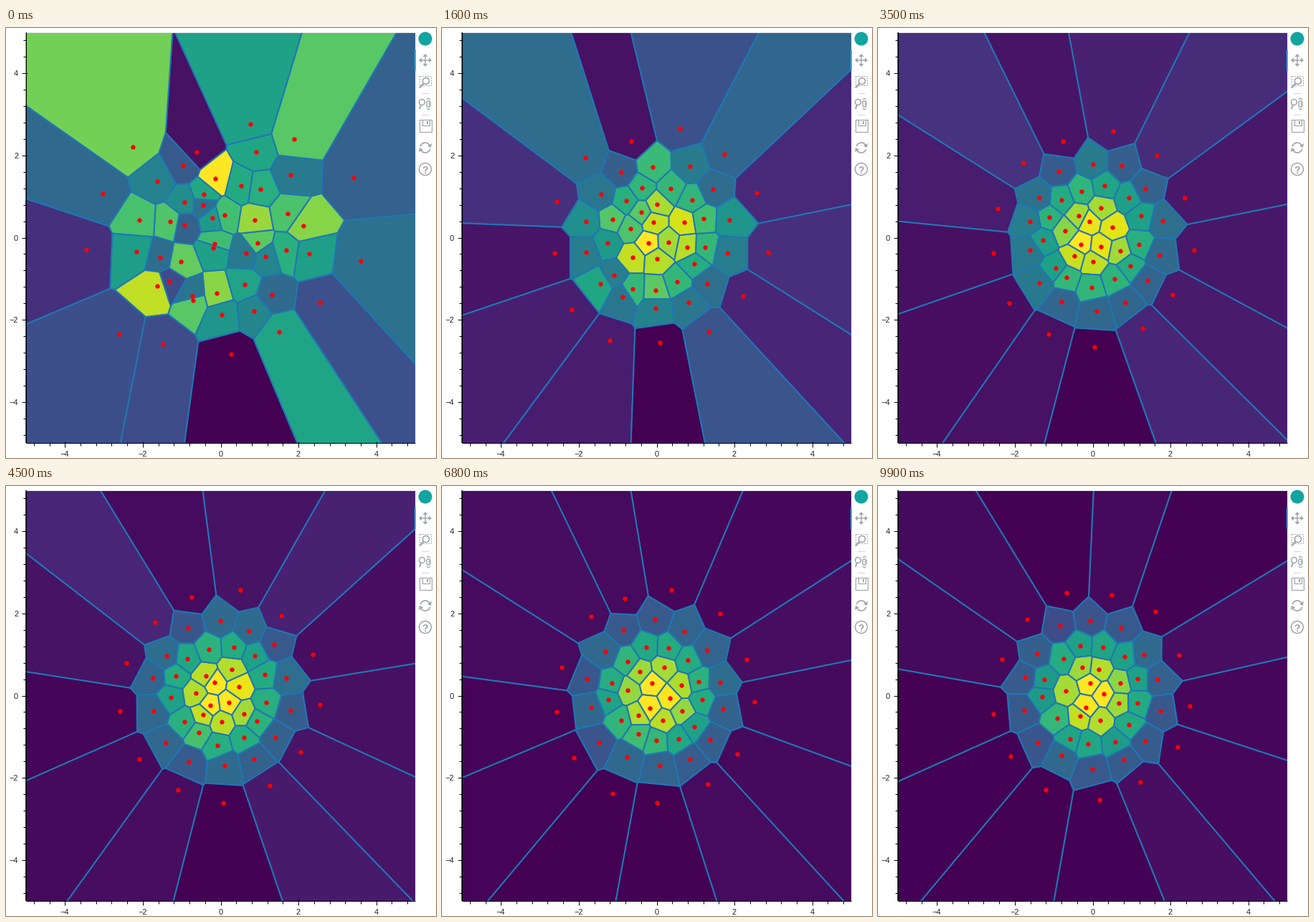
Write a matplotlib script that moves like this. It is 600 by 600 pixels and loops after 10 s.

```python
import matplotlib.pyplot as plt
import numpy as np
from matplotlib.animation import FuncAnimation
from matplotlib.collections import PolyCollection
from matplotlib.patches import Arc, Circle, FancyBboxPatch, Polygon, Rectangle

SIZE, DPI = 600, 100
FRAMES, INTERVAL = 100, 100
LEFT, TOP, WIDTH, HEIGHT = 27.5, 5.5, 543, 573
ORIGIN = np.array([LEFT + WIDTH / 2, TOP + HEIGHT / 2])
UNIT = np.array([WIDTH / 10, -HEIGHT / 10])
EDGE, GREY = "#1f77b4", "#a1a6a9"
PX = 72 / DPI                 # points per pixel

# Settled layout: (sites, radius, angle of the first site in degrees)
RINGS = [(3, .30, 100), (7, .70, 73), (13, 1.2, 75), (14, 1.78, 91),
         (13, 2.55, 78)]
ORDER_TIME = 11               # steps for the sites to fall into place
COUNT_TIME = 18               # steps for the cell weights to become reliable

rng = np.random.default_rng(12)


def settled():
    parts = []
    for count, radius, first in RINGS:
        a = np.radians(first) + 2 * np.pi * np.arange(count) / count
        parts.append(radius * np.column_stack([np.cos(a), np.sin(a)]))
    return np.concatenate(parts)


def wander(steps, count, keep=.95, kick=.02):
    """Random walk of every site that is pulled back to its home."""
    pos = rng.normal(0, kick / np.sqrt(1 - keep ** 2), (count, 2))
    for _ in range(steps):
        yield pos
        pos = keep * pos + rng.normal(0, kick, pos.shape)


HOME = settled()
COUNT = len(HOME)
angle = np.arctan2(HOME[:, 1], HOME[:, 0])
stretch = .2 + .2 * np.cos(2 * (angle - np.radians(15)))
SCATTER = HOME * stretch[:, None] + rng.normal(0, .2, HOME.shape)
WALK = list(wander(FRAMES, COUNT))
FIRST_COUNTS = (.64 - .14 * np.hypot(*HOME.T)
                + rng.normal(0, .2, COUNT)).clip(0, 1)


def sites(step):
    return HOME + SCATTER * np.exp(-step / ORDER_TIME) + WALK[step]


def weights(pts, step):
    """Rough first counts that turn into the weights of a normal law."""
    rough = np.exp(-step / COUNT_TIME)
    w = rough * FIRST_COUNTS + (1 - rough) * np.exp(-(pts ** 2).sum(1) / 3)
    return (w - w.min()) / (w.max() - w.min())


def clip(poly, nx, ny, c):
    """Part of a convex polygon where nx*x + ny*y <= c."""
    out = []
    px, py = poly[-1]
    pd = nx * px + ny * py - c
    for x, y in poly:
        d = nx * x + ny * y - c
        if (d > 0) != (pd > 0):
            k = pd / (pd - d)
            out.append((px + k * (x - px), py + k * (y - py)))
        if d <= 0:
            out.append((x, y))
        px, py, pd = x, y, d
    return out


def voronoi(pts):
    cells = []
    for p in pts:
        diff = pts - p
        dist = np.hypot(*diff.T)
        poly = [(-30, -30), (30, -30), (30, 30), (-30, 30)]
        for j in np.argsort(dist)[1:]:
            reach = max(np.hypot(x - p[0], y - p[1]) for x, y in poly)
            if dist[j] > 2 * reach:
                break
            nx, ny = map(float, diff[j])
            poly = clip(poly, nx, ny, float(diff[j] @ (p + pts[j])) / 2)
        cells.append(poly)
    return cells


fig = plt.figure(figsize=(SIZE / DPI, SIZE / DPI), dpi=DPI, facecolor="white")
plot = fig.add_axes([LEFT / SIZE, 1 - (TOP + HEIGHT) / SIZE,
                     WIDTH / SIZE, HEIGHT / SIZE])
plot.set(xlim=(-5, 5), ylim=(-5, 5))
plot.axis("off")
ui = fig.add_axes([0, 0, 1, 1], facecolor="none")
ui.set(xlim=(0, SIZE), ylim=(SIZE, 0))
ui.axis("off")


def line(xs, ys, color=GREY, width=1.5, **kw):
    ui.plot(xs, ys, color=color, lw=width * PX, solid_capstyle="butt", **kw)


def ring(x, y, r, width=1.5):
    ui.add_patch(Circle((x, y), r, fill=False, ec=GREY, lw=width * PX))


def fill(*pts):
    ui.add_patch(Polygon(pts, fc=GREY, lw=0))


def label(x, y, text, **kw):
    ui.text(x, y, text, family=["Liberation Sans", "DejaVu Sans"],
            va="center_baseline", **kw)


def draw_axes():
    right, bottom = LEFT + WIDTH, TOP + HEIGHT
    line([LEFT, right, right], [TOP, TOP, bottom], "#e5e5e5", 1)
    line([LEFT, LEFT], [TOP, bottom], "black", 1)
    line([LEFT, right], [bottom, bottom], "black", 1)
    for k in range(-12, 13):
        major = k % 5 == 0
        inner, outer = (2, 6) if major else (0, 4)
        x, y = np.floor(ORIGIN + UNIT * k * .4) + .5
        line([x, x], [bottom - inner, bottom + outer], "black", 1)
        line([LEFT - outer, LEFT + inner], [y, y], "black", 1)
        if major:
            text = str(k * 2 // 5).replace("-", "\u2212")
            style = dict(size=11 * PX, color="#222222")
            label(x, 593.5, text, ha="center", **style)
            label(17, y + .5, text, ha="right", **style)


def draw_toolbar():
    x = 585
    ui.add_patch(Circle((x, 15), 9.5, fc="#12a4a0", lw=0))
    line([571.3, 571.3], [30, 60], "#26aae1", 2)
    for y in (91, 121):
        line([580, 590], [y, y], "#d3d3d3", 1)

    # pan
    line([x - 6, x + 6], [45, 45])
    line([x, x], [39, 51])
    for dx, dy in ((1, 0), (-1, 0), (0, 1), (0, -1)):
        fill((x + 9 * dx, 45 + 9 * dy),
             (x + 5 * dx + 3.5 * dy, 45 + 5 * dy + 3.5 * dx),
             (x + 5 * dx - 3.5 * dy, 45 + 5 * dy - 3.5 * dx))

    # box zoom
    line([577, 593, 593, 577, 577], [67, 67, 80, 80, 67], width=1,
         dashes=(2, 1.5))
    ui.add_patch(Circle((586, 74), 4.5, fc="white", ec=GREY, lw=1.6 * PX))
    line([582.5, 577], [77.5, 83.5], width=2.5)

    # wheel zoom
    ring(580.5, 103.5, 4)
    line([579, 577], [107, 113], width=2)
    ui.add_patch(FancyBboxPatch((587, 102), 5, 8, fill=False, ec=GREY,
                                boxstyle="round,pad=0,rounding_size=2.5",
                                lw=1.5 * PX))
    line([589.5, 589.5], [103.5, 106.5], width=1.2)
    line([587, 589.5, 592], [100, 98, 100], width=1.2)
    line([587, 589.5, 592], [112, 114, 112], width=1.2)

    # save
    ui.add_patch(Rectangle((577, 128), 17, 17, fill=False, ec=GREY,
                           lw=1.2 * PX))
    line([580.5, 580.5, 590.5, 590.5], [128, 136, 136, 128], width=1.2)
    ui.add_patch(Rectangle((587, 129.5), 2, 4.5, fc=GREY, lw=0))

    # reset
    for a, b in ((195, 335), (15, 155)):
        ui.add_patch(Arc((x, 167), 14, 14, theta1=a, theta2=b, ec=GREY,
                         lw=1.7 * PX))
    fill((594, 161), (593, 167), (588, 164.5))
    fill((576, 173), (577, 167), (582, 169.5))

    # help
    ring(x, 197, 8.5)
    label(x, 197.5, "?", ha="center", size=14 * PX, color=GREY,
          weight="bold")


draw_axes()
draw_toolbar()
cells = PolyCollection([], edgecolors=EDGE, linewidths=2 * PX,
                       joinstyle="round")
plot.add_collection(cells, autolim=False)
dots = plot.scatter([], [], s=(6.4 * PX) ** 2, c="red", linewidths=0, zorder=3)


def update(step):
    pts = sites(step)
    cells.set_verts(voronoi(pts))
    cells.set_facecolor(plt.cm.viridis(weights(pts, step)))
    dots.set_offsets(pts)
    return cells, dots


anim = FuncAnimation(fig, update, frames=FRAMES, interval=INTERVAL,
                     init_func=lambda: update(0), repeat=True, repeat_delay=0)
plt.show()
```
